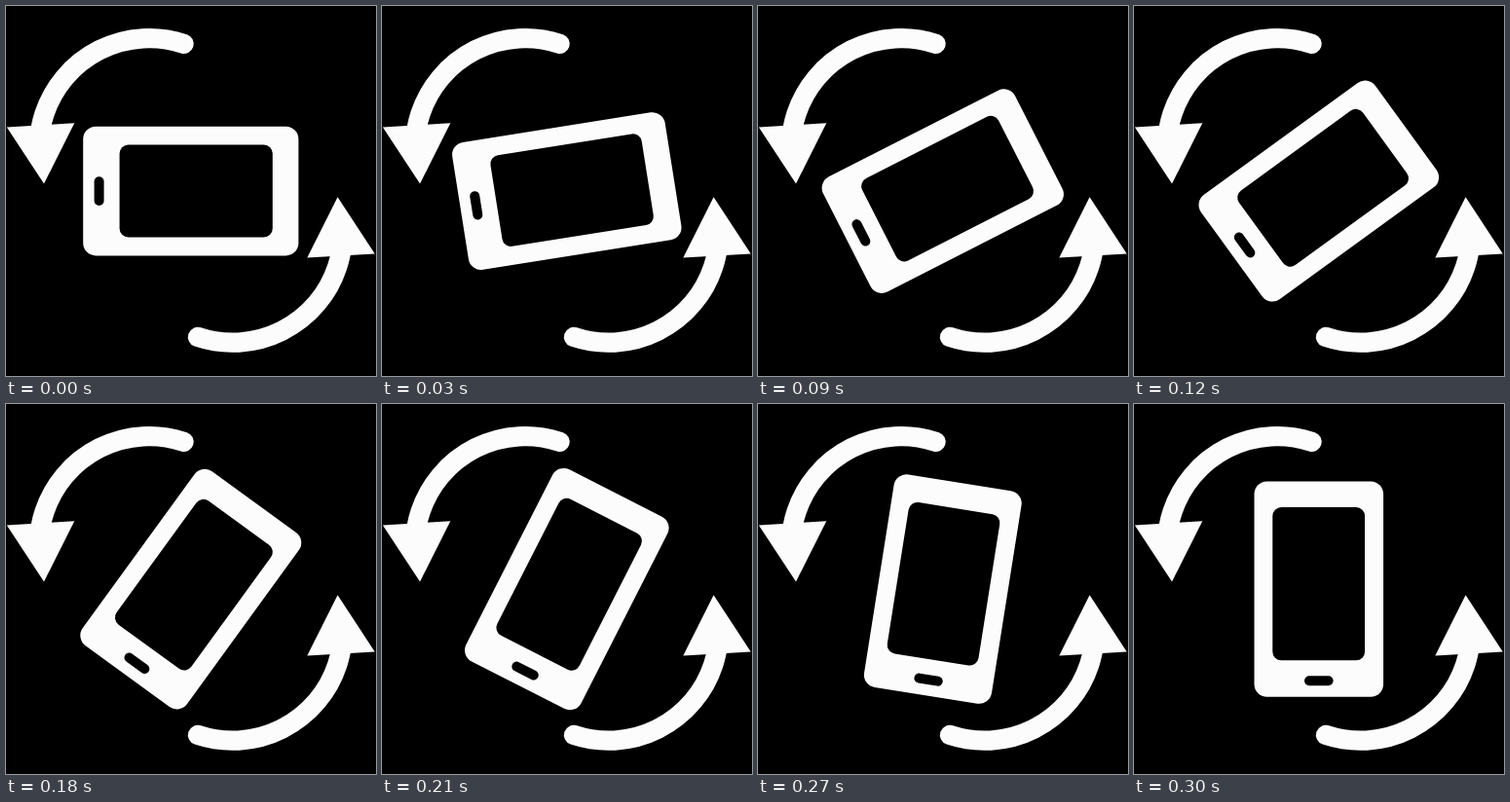
These frames come from a looping animation (380x380 px, 780 ms). An HTML page with a canvas:

```html
<!DOCTYPE html>
<html lang="en">
<head>
<meta charset="utf-8">
<title>Rotate device</title>
<style>
  html, body { margin: 0; width: 100%; height: 100%; overflow: hidden; background: #000; }
  canvas { display: block; width: 380px; height: 380px; }
</style>
</head>
<body>
<canvas id="stage" width="380" height="380"></canvas>
<script>
const ctx = document.getElementById('stage').getContext('2d');
const LOOP = 780, STEP = 30, STEPS = 10;
const WHITE = '#fcfcfc', BLACK = '#000';
const CENTER = { x: 189.8, y: 190.1 };

function roundedBox(x, y, w, h, r, color) {
  ctx.fillStyle = color;
  ctx.beginPath();
  ctx.roundRect(x, y, w, h, r);
  ctx.fill();
}

function drawArrow() {
  ctx.strokeStyle = ctx.fillStyle = WHITE;
  ctx.lineWidth = 20.3;
  ctx.lineCap = 'round';
  ctx.beginPath();
  ctx.arc(147, 146.4, 113.3, -1.251, -2.95, true);
  ctx.stroke();
  ctx.beginPath();
  ctx.moveTo(0.8, 124.4);
  ctx.lineTo(70.3, 120.3);
  ctx.lineTo(39, 182.6);
  ctx.fill();
}

function drawPhone(angle) {
  ctx.save();
  ctx.translate(CENTER.x, CENTER.y);
  ctx.rotate(-angle);
  roundedBox(-110.6, -66.3, 221.2, 132.6, 13, WHITE);
  roundedBox(-73.2, -47.5, 157.2, 94.8, 9, BLACK);
  roundedBox(-99.2, -14.8, 10, 29.6, 5, BLACK);
  ctx.restore();
}

function draw(time) {
  const step = Math.min(STEPS, Math.floor((time % LOOP) / STEP));
  ctx.fillStyle = BLACK;
  ctx.fillRect(0, 0, 380, 380);
  drawArrow();
  // The second arrow is the first one turned by half a circle.
  ctx.save();
  ctx.translate(379.6, 378.8);
  ctx.rotate(Math.PI);
  drawArrow();
  ctx.restore();
  drawPhone(step / STEPS * Math.PI / 2);
}

let start;
function tick(now) {
  start ??= now;
  draw(now - start);
  requestAnimationFrame(tick);
}
draw(0);
requestAnimationFrame(tick);
</script>
</body>
</html>
```
